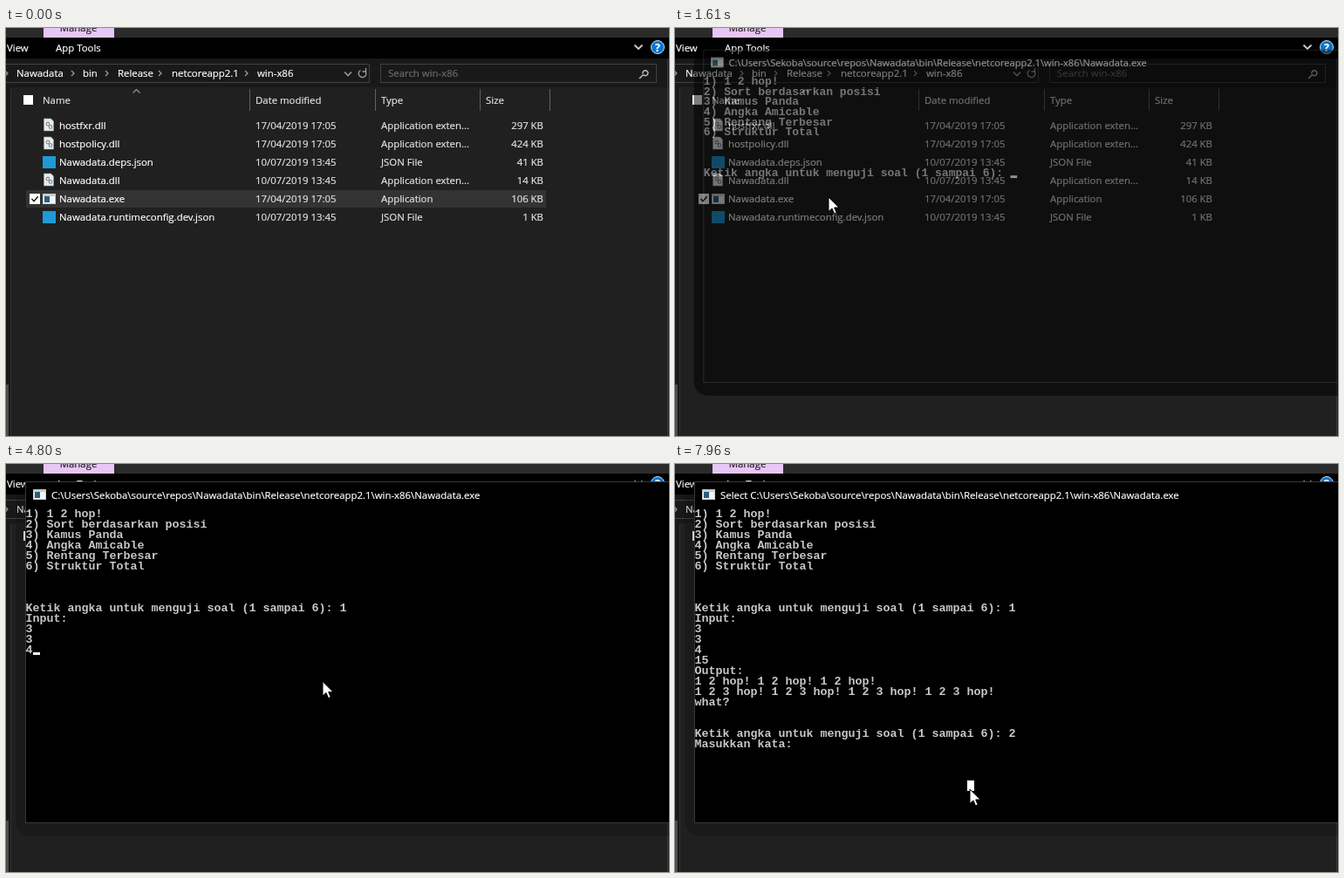
An HTML page that plays this animation: 760x468 px, repeating every 8 s.

```html
<!DOCTYPE html>
<html lang="id">
<head>
<meta charset="utf-8">
<title>Console run</title>
<style>
  html, body { margin: 0; width: 100%; height: 100%; overflow: hidden; background: #202020; }
  svg { display: block; }
  text {
    font: 11.4px "Open Sans", "Noto Sans", sans-serif; white-space: pre;
    color: #fff; fill: currentColor; stroke: currentColor; stroke-width: 0.2px;
  }
  .mono { font: bold 13.33px "Liberation Mono", monospace; color: #c8c8c8; stroke: none; }
  .line { fill: none; stroke: #9a9a9a; stroke-width: 1.3; }
</style>
</head>
<body>
<svg id="stage" width="760" height="468" viewBox="0 0 760 468"></svg>
<script>
const NS = 'http://www.w3.org/2000/svg';
const stage = document.getElementById('stage');
const LOOP = 8000;

function add(parent, tag, attrs, content) {
  const el = document.createElementNS(NS, tag);
  for (const k in attrs) el.setAttribute(k, attrs[k]);
  if (content !== undefined) el.textContent = content;
  parent.appendChild(el);
  return el;
}
const rect = (p, x, y, width, height, fill, more) =>
  add(p, 'rect', { x, y, width, height, fill, ...more });
const label = (p, x, y, s, more) => add(p, 'text', { x, y, ...more }, s);
const line = (p, d, more) => add(p, 'path', { d, class: 'line', ...more });

function appIcon(p, x, y) {
  rect(p, x, y, 15, 12, '#c9cdd0');
  rect(p, x + 1, y + 3, 13, 8, '#f4f4f4');
  rect(p, x + 2, y + 3, 6, 7, '#27627c');
}
function dllIcon(p, x, y) {
  add(p, 'path', { d: `M${x} ${y}h8l3 3v11h-11z`, fill: '#e9ecee', stroke: '#9a9fa3', 'stroke-width': 0.6 });
  const gear = { fill: 'none', stroke: '#7d8f9b', 'stroke-width': 1.2 };
  add(p, 'circle', { cx: x + 4.5, cy: y + 6, r: 1.8, ...gear });
  add(p, 'circle', { cx: x + 7.5, cy: y + 9.5, r: 1.8, ...gear });
}

// File browser
const ui = add(stage, 'g', {});
rect(ui, 0, 0, 760, 468, '#202020');
rect(ui, 0, 0, 760, 11, '#2b2b2b');
rect(ui, 0, 11, 760, 24, '#000');
rect(ui, 0, 35, 760, 33, '#191919');
rect(ui, 0, 68, 5, 400, '#191919');
rect(ui, 5, 70, 1, 398, '#303030');
rect(ui, 0, 409, 3, 59, '#4d4d4d');
rect(ui, 758, 35, 1, 433, '#3a3a3a');
rect(ui, 43, 0, 81, 11, '#e8c6f6');
label(ui, 83, 3.5, 'Manage', { 'text-anchor': 'middle', style: 'color:#222' });
label(ui, 1, 27, 'View');
label(ui, 57, 27, 'App Tools');
line(ui, 'M720.5 19.5l4.5 4.5 4.5-4.5', { style: 'stroke:#ccc;stroke-width:1.8' });
add(ui, 'circle', { cx: 747, cy: 22, r: 7.5, fill: '#0a74d0', stroke: '#c4e0f6' });
label(ui, 747, 26.5, '?', { 'text-anchor': 'middle', style: 'font-weight:bold;font-size:12.5px' });

rect(ui, -1.5, 41.5, 418, 21, 'none', { stroke: '#424242' });
rect(ui, 429.5, 41.5, 316, 21, 'none', { stroke: '#424242' });
[[12, 'Nawadata'], [88, 'bin'], [128, 'Release'], [190, 'netcoreapp2.1'], [288, 'win-x86']]
  .forEach(([x, s]) => label(ui, x, 56, s));
[-1, 75, 114, 175, 274].forEach(x => line(ui, `M${x} 49l3 3-3 3`));
line(ui, 'M388 50.5l4 4 4-4', { style: 'stroke-width:1.6' });
line(ui, 'M411.5 49.2a4.3 4.3 0 1 1-5-.7M412.5 46v4h-4', { style: 'stroke-width:1.4' });
label(ui, 438, 56, 'Search win-x86', { style: 'color:#6c6c6c' });
line(ui, 'M726 58l4.5-4.5M730 52.5a3 3 0 1 1 .5 1', { style: 'stroke:#bbb;stroke-width:1.5' });

rect(ui, 20, 77, 11, 11, '#fff');
line(ui, 'M145.5 74.5l4-4 4 4', { style: 'stroke-width:1.1' });
[[42, 'Name'], [286, 'Date modified'], [430, 'Type'], [550, 'Size']]
  .forEach(([x, s]) => label(ui, x, 87, s, { style: 'color:#e4e4e4' }));
[279, 423, 543, 623].forEach(x => rect(ui, x, 70, 1, 25, '#606060'));

const selRow = rect(ui, 23.5, 186.5, 595, 19, '#333');
const OLD = '17/04/2019 17:05', NEW = '10/07/2019 13:45';
const TYPES = { dll: 'Application exten...', json: 'JSON File', exe: 'Application' };
[['hostfxr.dll', OLD, 297], ['hostpolicy.dll', OLD, 424], ['Nawadata.deps.json', NEW, 41],
 ['Nawadata.dll', NEW, 14], ['Nawadata.exe', OLD, 106], ['Nawadata.runtimeconfig.dev.json', NEW, 1]]
  .forEach(([name, date, size], i) => {
    const y = 116 + 21 * i, ext = name.split('.').pop();
    if (ext === 'dll') dllIcon(ui, 43.5, y - 12);
    else if (ext === 'json') rect(ui, 42, y - 11, 15, 14, '#1f9ad6');
    else appIcon(ui, 42, y - 10);
    label(ui, 61, y, name);
    const dim = { style: 'color:#e4e4e4' };
    label(ui, 286, y, date, dim);
    label(ui, 430, y, TYPES[ext], dim);
    label(ui, 616, y, size + ' KB', { ...dim, 'text-anchor': 'end' });
  });
rect(ui, 27, 190, 12, 12, '#fff');
line(ui, 'M29.5 196l2.5 2.7 4.7-5.5', { style: 'stroke:#111;stroke-width:1.4' });

// Console window
const win = add(stage, 'g', {});
const shadow = rect(win, 11, 20, 800, 407, '#000', { rx: 17 });
rect(win, 22.5, 20.5, 850, 391, '#000', { stroke: '#383838' });
appIcon(win, 31, 29);
const title = label(win, 52, 40, '');
const rows = Array.from({ length: 28 }, (_, i) => label(win, 22.5, 61 + 12 * i, '', { class: 'mono' }));
const caret = rect(win, 0, 0, 8, 3, '#fff');
const block = rect(win, 0, 0, 8, 12, '#fff');

const pointer = add(stage, 'path', {
  d: 'M0 0V16.5L4 13L6.5 19L9.2 18L6.7 12H12Z',
  fill: '#fff', stroke: '#000', 'stroke-width': 1
});

const EXE = 'C:\\Users\\Sekoba\\source\\repos\\Nawadata\\bin\\Release\\netcoreapp2.1\\win-x86\\Nawadata.exe';
const ASK = '\n\n\nKetik angka untuk menguji soal (1 sampai 6): ';
const MENU = '1) 1 2 hop!\n2) Sort berdasarkan posisi\n3) Kamus Panda\n4) Angka Amicable\n' +
  '5) Rentang Terbesar\n6) Struktur Total\n';
const RESULT = '\nOutput:\n' + '1 2 hop! '.repeat(3) + '\n' + '1 2 3 hop! '.repeat(4) + '\nwhat?';
const typed = [
  [0, MENU + ASK], [3700, '1'], [3950, '\nInput:\n'], [4080, '3'], [4200, '\n'],
  [4400, '3'], [4540, '\n'], [4700, '4'], [4840, '\n'], [5020, '1'], [5200, '5'],
  [5500, RESULT + ASK], [6200, '2'], [6500, '\nMasukkan kata:\n']
];
// time, x, y
const path = [
  [100, 330, 394], [450, 222, 255], [750, 176, 194], [1850, 176, 194], [2330, 269, 213],
  [2850, 363, 249.5], [6050, 363, 249.5], [6400, 361, 231], [6800, 361, 238],
  [7350, 361, 408], [7550, 357, 402], [7810, 338, 373]
];

function pointerAt(t) {
  const i = path.findIndex(p => p[0] > t);
  if (i < 0) return path[path.length - 1].slice(1);
  const a = path[Math.max(0, i - 1)], b = path[i];
  const u = Math.max(0, (t - a[0]) / (b[0] - a[0] || 1));
  const e = u * u * (3 - 2 * u);
  return [a[1] + (b[1] - a[1]) * e, a[2] + (b[2] - a[2]) * e];
}
const show = (el, on) => el.setAttribute('visibility', on ? 'inherit' : 'hidden');
const between = (t, a, b) => t >= a && t < b;

const OPEN = 1510, BLINK = 530;

function draw(t) {
  const focused = between(t, 700, OPEN);
  selRow.setAttribute('fill', focused ? '#777' : '#333');
  selRow.setAttribute('stroke', focused ? '#8c8c8c' : '#333');
  show(selRow, t < OPEN);

  const open = Math.min(1, Math.max(0, (t - OPEN) / 200));
  const s = 0.95 + 0.05 * open;
  win.setAttribute('opacity', open);
  win.setAttribute('transform', `translate(440 215) scale(${s}) translate(-440 -215)`);
  shadow.setAttribute('opacity', open < 1 ? 1 : 0.18);
  show(win, open > 0);

  const text = typed.filter(k => k[0] <= t).map(k => k[1]).join('');
  const lines = text.split('\n');
  rows.forEach((r, i) => { r.textContent = lines[i] || ''; });

  const marked = between(t, 2900, 3650) || t >= 7850;
  title.textContent = (between(t, 2900, 3900) || t >= 7850 ? 'Select ' : '') + EXE;

  const [x, y] = pointerAt(t);
  show(pointer, t >= 100);
  pointer.setAttribute('transform', `translate(${x} ${y})`);

  const last = lines.length - 1;
  caret.setAttribute('x', 23 + 8 * lines[last].length);
  caret.setAttribute('y', 60 + 12 * last);
  show(caret, open > 0 && !marked && (t + 900) % (2 * BLINK) < BLINK);
  block.setAttribute('x', 23 + 8 * Math.floor((x - 23) / 8));
  block.setAttribute('y', 51 + 12 * Math.floor((y - 51) / 12));
  show(block, marked);
}

const start = performance.now();
function tick() {
  draw((performance.now() - start) % LOOP);
  requestAnimationFrame(tick);
}
draw(0);
tick();
</script>
</body>
</html>
```
